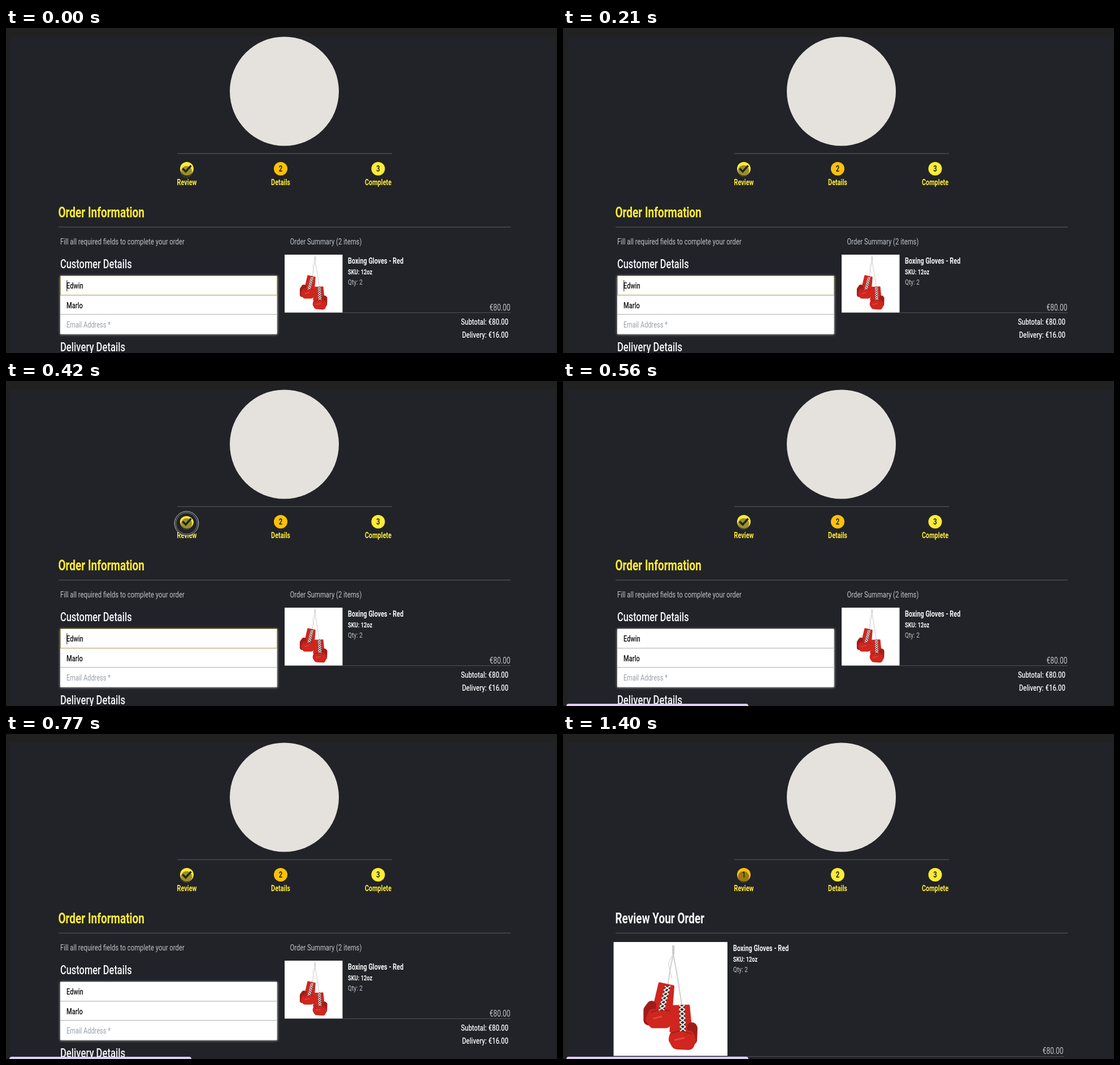
Write an HTML page with a canvas that moves like this. It is 975 by 575 pixels and loops after 1470 ms.

```html
<!DOCTYPE html>
<html lang="en">
<head>
<meta charset="utf-8">
<title>Checkout</title>
<style>
html, body { margin: 0; width: 100%; height: 100%; overflow: hidden; background: #222328; }
canvas { display: block; }
</style>
</head>
<body>
<canvas id="stage" width="975" height="575"></canvas>
<script>
const ctx = document.getElementById('stage').getContext('2d');
const LOOP = 1470, TICK = 70;
const CONDENSE = 0.75; // one face-wide ratio for the narrow display style
const BG = '#222328', YELLOW = '#ffec35', AMBER = '#ffc107';
const WHITE = '#f5f6f7', GREY = '#bfc3c7', RULE = '#4b4b4c';
const RED = '#cf261f', DARK_RED = '#9e1d19', LIGHT_RED = '#e0483c';

function rect(x, y, w, h, color) {
  ctx.fillStyle = color;
  ctx.fillRect(x, y, w, h);
}

function disc(x, y, r, color) {
  ctx.fillStyle = color;
  ctx.beginPath();
  ctx.arc(x, y, r, 0, Math.PI * 2);
  ctx.fill();
}

function ring(x, y, r, width, color) {
  ctx.strokeStyle = color;
  ctx.lineWidth = width;
  ctx.beginPath();
  ctx.arc(x, y, r, 0, Math.PI * 2);
  ctx.stroke();
}

function line(points, width, color) {
  ctx.beginPath();
  points.forEach(([x, y], i) => i ? ctx.lineTo(x, y) : ctx.moveTo(x, y));
  ctx.lineWidth = width;
  ctx.strokeStyle = color;
  ctx.stroke();
}

// closed shape with the given points as rounded corners
function blob(points, radius, color) {
  const n = points.length, [ax, ay] = points[0], [bx, by] = points[n - 1];
  ctx.beginPath();
  ctx.moveTo((ax + bx) / 2, (ay + by) / 2);
  points.forEach(([x, y], i) => ctx.arcTo(x, y, ...points[(i + 1) % n], radius));
  ctx.closePath();
  ctx.fillStyle = color;
  ctx.fill();
}

// y is the middle of the capital letters
function label(text, x, y, size, color, { weight = 400, align = 'left' } = {}) {
  ctx.save();
  ctx.translate(x, y + size * 0.355);
  ctx.scale(CONDENSE, 1);
  ctx.font = `${weight} ${size}px Roboto, "Open Sans", sans-serif`;
  ctx.textAlign = align;
  ctx.fillStyle = color;
  ctx.fillText(text, 0, 0);
  ctx.restore();
}

function lacing(x1, y1, x2, y2) {
  const dx = (x2 - x1) / 6, dy = (y2 - y1) / 6;
  line([[x1, y1], [x2, y2]], 9, '#2b2423');
  for (let i = 0; i < 6; i++) {
    const x = x1 + dx * i, y = y1 + dy * i;
    line([[x - 5, y], [x + dx + 5, y + dy]], 2.2, '#e9e5e2');
    line([[x + 5, y], [x + dx - 5, y + dy]], 2.2, '#e9e5e2');
  }
}

function gloves(x, y, size) {
  ctx.save();
  ctx.translate(x, y);
  ctx.scale(size / 202, size / 202);
  rect(0, 0, 202, 202, '#fff');
  line([[106, 22], [101, 45], [96, 78]], 2, '#cfcfcf');
  line([[106, 22], [113, 60], [121, 112]], 2, '#cfcfcf');
  line([[106, 20], [97, 38], [104, 66]], 1.2, '#d8d8d8');
  line([[106, 6], [106, 22]], 4, '#cacaca');

  blob([[80, 71], [108, 77], [104, 128], [67, 126]], 2, RED);
  blob([[69, 96], [76, 110], [72, 150], [53, 146], [53, 118]], 9, DARK_RED);
  blob([[64, 119], [100, 118], [106, 140], [98, 153], [66, 153], [56, 138]], 10, RED);
  line([[66, 125], [80, 120], [100, 122]], 2, DARK_RED);
  line([[70, 136], [86, 132]], 3, LIGHT_RED);
  lacing(96, 78, 85, 121);

  blob([[103, 112], [135, 111], [140, 162], [99, 160]], 2, RED);
  blob([[136, 132], [149, 150], [148, 178], [134, 188], [130, 150]], 9, DARK_RED);
  blob([[101, 157], [140, 157], [147, 174], [140, 192], [106, 190], [97, 174]], 11, RED);
  line([[101, 162], [119, 157], [139, 163]], 2, DARK_RED);
  line([[108, 174], [126, 170]], 3, LIGHT_RED);
  lacing(121, 112, 123, 158);
  ctx.restore();
}

function step(x, mark, name, color) {
  disc(x, 249, 12, color);
  if (mark) label(mark, x, 248.5, 15, '#29251c', { weight: 600, align: 'center' });
  label(name, x, 273, 14.5, YELLOW, { weight: 600, align: 'center' });
}

function header(title, titleColor, reviewing) {
  rect(0, 0, 975, 575, '#212122');
  rect(8, 15, 965, 560, BG);
  disc(492.5, 112, 96.5, '#e5e2dd');
  rect(303, 221.5, 380, 1.5, RULE);
  step(320, reviewing ? '1' : '', 'Review', reviewing ? AMBER : YELLOW);
  step(486, '2', 'Details', reviewing ? YELLOW : AMBER);
  step(658.5, '3', 'Complete', YELLOW);
  label(title, 92.5, 326, 25.3, titleColor, { weight: 600 });
  rect(93, 351.5, 800, 1.5, RULE);
}

function product(x, y) {
  label('Boxing Gloves - Red', x, y, 14.5, WHITE, { weight: 600 });
  label('SKU: 12oz', x, y + 19.5, 12.4, WHITE, { weight: 600 });
  label('Qty: 2', x, y + 37.5, 13.6, GREY);
}

function form(focused) {
  ctx.save();
  ctx.shadowColor = '#c8c8c8';
  ctx.shadowBlur = 4;
  rect(96, 438.5, 383.5, 103, '#fff');
  ctx.restore();
  for (const y of [472, 506]) rect(96, y, 383.5, 1.3, '#bdbdbd');
  if (focused) {
    ctx.strokeStyle = '#b4aa68';
    ctx.lineWidth = 1;
    ctx.strokeRect(96.5, 438.5, 383, 34);
    rect(107.3, 446, 1, 20, '#222');
  }
  label('Edwin', 107, 456, 14.8, '#111', { weight: 500 });
  label('Marlo', 107, 490.5, 14.8, '#111', { weight: 500 });
  label('Email Address *', 107, 524.5, 14.7, '#99a0a7');
}

function details(focused) {
  header('Order Information', YELLOW, false);
  label('Fill all required fields to complete your order', 96, 378, 15.1, GREY);
  label('Customer Details', 96, 417, 21.9, WHITE, { weight: 500 });
  form(focused);
  label('Delivery Details', 96, 564, 22.2, WHITE, { weight: 500 });
  label('Order Summary (2 items)', 502.5, 378, 15.1, GREY);
  gloves(493, 401, 102.5);
  product(605, 412);
  rect(595, 503, 298, 1.2, RULE);
  label('€80.00', 892.5, 494, 16, GREY, { align: 'right' });
  label('Subtotal: €80.00', 889, 519.5, 15.2, WHITE, { weight: 500, align: 'right' });
  label('Delivery: €16.00', 889, 542.5, 15.2, WHITE, { weight: 500, align: 'right' });
}

function review() {
  header('Review Your Order', WHITE, true);
  gloves(89.5, 368, 201.5);
  product(301, 379);
  label('€80.00', 885.5, 560.5, 16, GREY, { align: 'right' });
  rect(291, 570, 595, 1.2, RULE);
}

function clickRing(radius, alpha) {
  ctx.save();
  ctx.globalAlpha = alpha;
  ring(319.5, 252, (radius + 13) / 2, radius - 13, BG);
  ring(319.5, 252, radius, 1, '#c9c9c9');
  ring(319.5, 252, radius - 2.5, 1, '#8b8b8b');
  ctx.restore();
}

function pointer(t) {
  const y = 254 - 1.5 * Math.min(t / 210, 1);
  disc(319.5, y, 10, 'rgba(45, 42, 30, 0.48)');
  ring(319.5, y, 10, 0.8, 'rgba(235, 230, 200, 0.3)');
}

function checkMark() {
  line([[312.5, 248.5], [318, 254], [327.5, 243.5]], 3.4, '#24231c');
}

function statusBar() {
  ctx.fillStyle = '#dfcdf5';
  ctx.beginPath();
  ctx.roundRect(6, 571, 322, 8, 4);
  ctx.fill();
}

function draw(now) {
  const t = Math.floor((now % LOOP) / TICK) * TICK;
  const reviewing = t >= 840;
  if (reviewing) review();
  else details(t < 560);
  if (t >= 350 && t < 560) {
    const age = (t - 350) / TICK;
    clickRing(Math.min(17 + 4.3 * age, 21.3), age > 1 ? 0.5 : 1);
  }
  pointer(t);
  if (!reviewing) checkMark();
  if (t >= 560) statusBar();
  requestAnimationFrame(draw);
}

requestAnimationFrame(draw);
</script>
</body>
</html>
```
